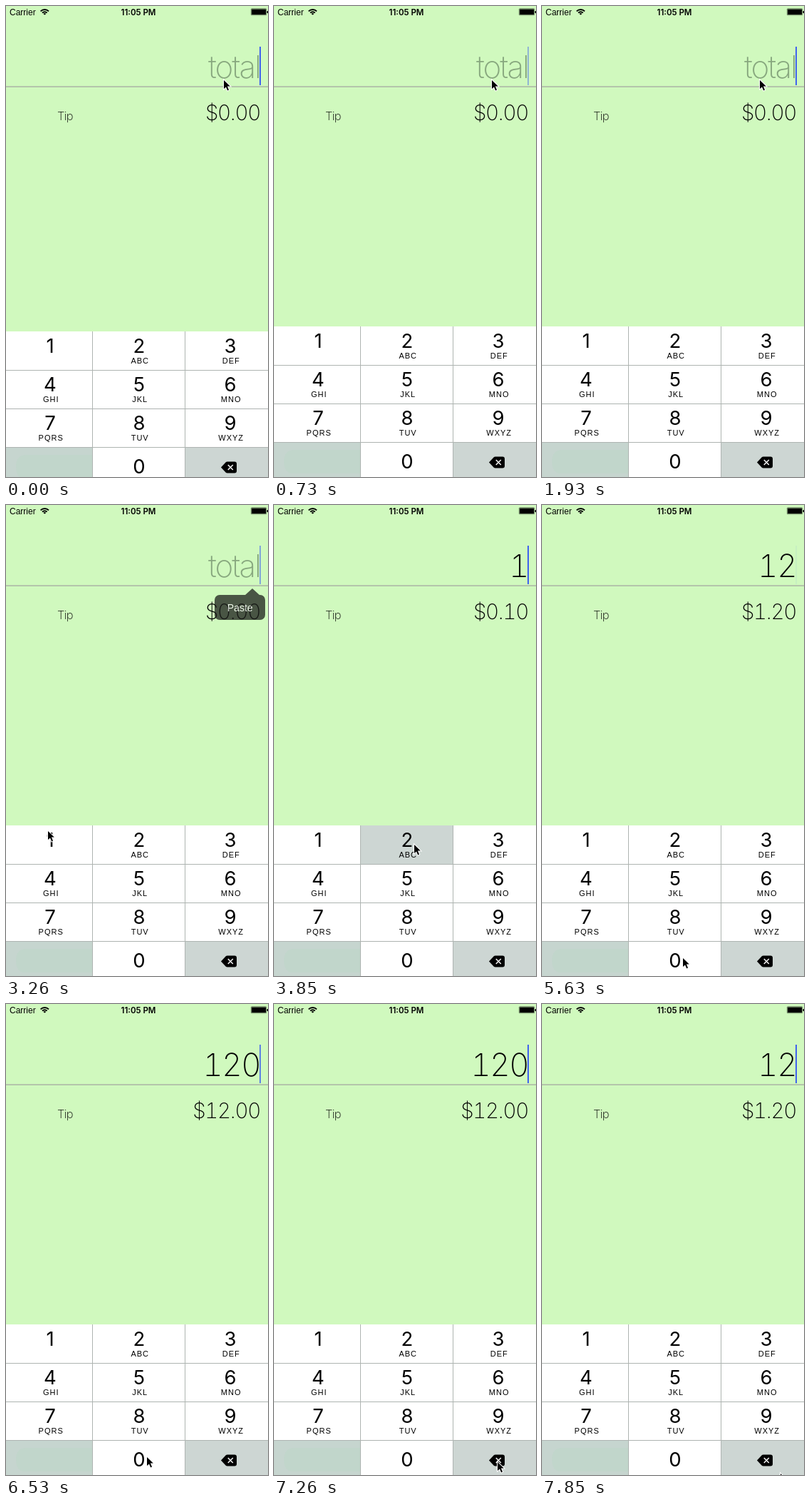
These frames come from a looping animation (368x660 px, 8 s). An HTML page:

```html
<!DOCTYPE html>
<html lang="en">
<head>
<meta charset="utf-8">
<title>Tip calculator</title>
<style>
  html, body { margin: 0; width: 100%; height: 100%; overflow: hidden; background: #d0f9be; }
  svg { display: block; width: 368px; height: 660px; }
  text { font-family: "Liberation Sans", Arial, sans-serif; }
  .inter { font-family: Inter, Roboto, sans-serif; }
  .amount { font-feature-settings: "tnum"; text-anchor: end; }
  .mid { text-anchor: middle; }
</style>
</head>
<body>
<svg viewBox="0 0 368 660">
  <rect width="368" height="660" fill="#d0f9be"/>
  <text x="5" y="12.5" font-size="12">Carrier</text>
  <g fill="none" stroke="#000" stroke-width="1.9">
    <path d="M48.6 7.4A8 8 0 0 1 60 7.4M51 9.7A4.6 4.6 0 0 1 57.6 9.7"/>
    <path d="M54.3 12.6L52.4 10.9A2.6 2.6 0 0 1 56.2 10.9Z" fill="#000" stroke="none"/>
  </g>
  <text class="inter mid" x="186" y="12.5" font-size="11.5" font-weight="600">11:05 PM</text>
  <rect x="344.25" y="3.75" width="21.5" height="9" rx="1" fill="none" stroke="#000" stroke-width=".5"/>
  <rect x="345" y="4.5" width="20" height="7.5"/>
  <rect x="366.5" y="7" width="1.5" height="3"/>

  <text id="entry" class="inter amount" x="357" y="101" font-size="44" font-weight="150"></text>
  <rect id="caret" x="356" y="57" width="2" height="54" fill="#3f62ee"/>
  <rect y="112.3" width="368" height="1.6" fill="#adb8a7"/>
  <text class="inter" x="72" y="160" font-size="16.5" font-weight="250" letter-spacing="-.6">Tip</text>
  <text id="tip" class="inter amount" x="357" y="160" font-size="29.5" font-weight="220" letter-spacing="-1.3"></text>

  <g id="menu">
    <path d="M300 126H336L346 117L356 126H357A7 7 0 0 1 364 133V154A7 7 0 0 1 357 161H300A7 7 0 0 1 293 154V133A7 7 0 0 1 300 126Z" fill="#1b1d1a"/>
    <text class="mid" x="328.7" y="149" font-size="14" fill="#fff">Paste</text>
  </g>

  <g id="pad"></g>
  <path id="mouse" d="M1 2V14L4 11.4L6.2 16.4L8 15.6L5.9 10.6H9.8Z" stroke="#fff" stroke-width="2" paint-order="stroke"/>
</svg>
<script>
const LOOP = 8000;
const BEAT = 147.8; // the screen refreshes once per beat
const GRAY = '#cdd6d3';
const $ = id => document.getElementById(id);
const set = (id, name, value) => $(id).setAttribute(name, value);
const clamp = value => Math.min(1, Math.max(0, value));

// Each key is held for one beat: [beat, key].
const presses = [[23, 1], [26, 2], [40, 0], [50, 'del']];

const mouseStart = { x: 305, y: 102 };
const moves = [
  { from: 19, to: 22, x: 58, y: 455 },
  { from: 23, to: 26, x: 196, y: 474 },
  { from: 29, to: 35, x: 197, y: 633, bow: 62 },
  { from: 46, to: 49, x: 313, y: 640 },
  { from: 51, to: 53, x: 334, y: 656 },
];

function buildPad() {
  const columns = [[0, 62], [121, 187], [251, 315]];
  const letters = ['', 'ABC', 'DEF', 'GHI', 'JKL', 'MNO', 'PQRS', 'TUV', 'WXYZ'];
  const keys = [1, 2, 3, 4, 5, 6, 7, 8, 9, 'blank', 0, 'del'];
  let out = '';
  keys.forEach((key, i) => {
    const [x, center] = columns[i % 3];
    const y = 449 + 54 * Math.floor(i / 3);
    out += `<rect id="key-${key}" x="${x}" y="${y}" width="130" height="54"/>`;
    if (typeof key === 'number') out += `<text class="inter mid" x="${center}" y="${y + (key ? 30 : 37)}" font-size="27.5">${key}</text>`;
    if (letters[i]) out += `<text class="mid" x="${center + 1.2}" y="${y + 45}" font-size="11" letter-spacing="1">${letters[i]}</text>`;
  });
  $('pad').innerHTML = out + `
    <path d="M121 622H26Q14 624 14 638Q14 655 26 655H121Z" fill="#c1d6cb"/>
    <path d="M302 639.5L308.5 632.5Q309.5 631.5 311 631.5H321Q324 631.5 324 634.5V644.5Q324 647.5 321 647.5H311Q309.5 647.5 308.5 646.5Z"/>
    <path d="M311.8 636L318.8 643M318.8 636L311.8 643" stroke="#fff" stroke-width="1.4"/>
    <path d="M0 503.5H368M0 557.5H368M0 611.5H368M121.5 449V660M251.5 449V660" stroke="#aeb4b1"/>`;
  set('key-blank', 'fill', '#c6d5cf');
}

function mouseAt(beat) {
  let { x, y } = mouseStart;
  for (const move of moves) {
    const p = clamp((beat - move.from) / (move.to - move.from));
    const eased = p * p * (3 - 2 * p);
    x += (move.x - x) * eased - (move.bow || 0) * Math.sin(Math.PI * p);
    y += (move.y - y) * eased;
  }
  return [x, y];
}

// The caret blinks, and typing makes it solid again for a moment.
function caretOpacity(beat, lastTyped) {
  const idle = lastTyped === null ? beat * BEAT : (beat - lastTyped) * BEAT - 205;
  if (idle < 0) return 1;
  const phase = idle % 990;
  return Math.max(.06, 1 - clamp((phase - 200) / 180), clamp((phase - 650) / 200));
}

function draw(time) {
  const beat = Math.floor((time + 10) / BEAT);
  const typed = presses.filter(([down]) => down < beat);
  const entry = typed.reduce((text, [, key]) => key === 'del' ? text.slice(0, -1) : text + key, '');
  const lastTyped = typed.length ? typed.at(-1)[0] + 1 : null;

  $('entry').textContent = entry || 'total';
  set('entry', 'fill', entry ? '#000' : '#87a77e');
  set('entry', 'letter-spacing', entry ? -1.6 : -2);
  $('tip').textContent = '$' + (entry / 10).toFixed(2);
  set('caret', 'opacity', caretOpacity(beat, lastTyped));
  set('menu', 'opacity', .74 * clamp(Math.min(beat - 18, 24 - beat) / 2));
  set('pad', 'transform', `translate(0 ${7 * clamp(1 - beat / 2) ** 2})`);
  set('mouse', 'transform', `translate(${mouseAt(beat)})`);
  for (const [, key] of presses) {
    const held = presses.some(([down, name]) => down === beat && name === key);
    set('key-' + key, 'fill', held === (key === 'del') ? '#fff' : GRAY);
  }
}

buildPad();
for (const key of document.querySelectorAll('#pad rect:not([fill])')) key.setAttribute('fill', '#fff');
for (const key of [0, 1, 2]) set('key-' + key, 'fill', '#fff');
const began = performance.now();
function tick() {
  draw((performance.now() - began) % LOOP);
  requestAnimationFrame(tick);
}
tick();
</script>
</body>
</html>
```
